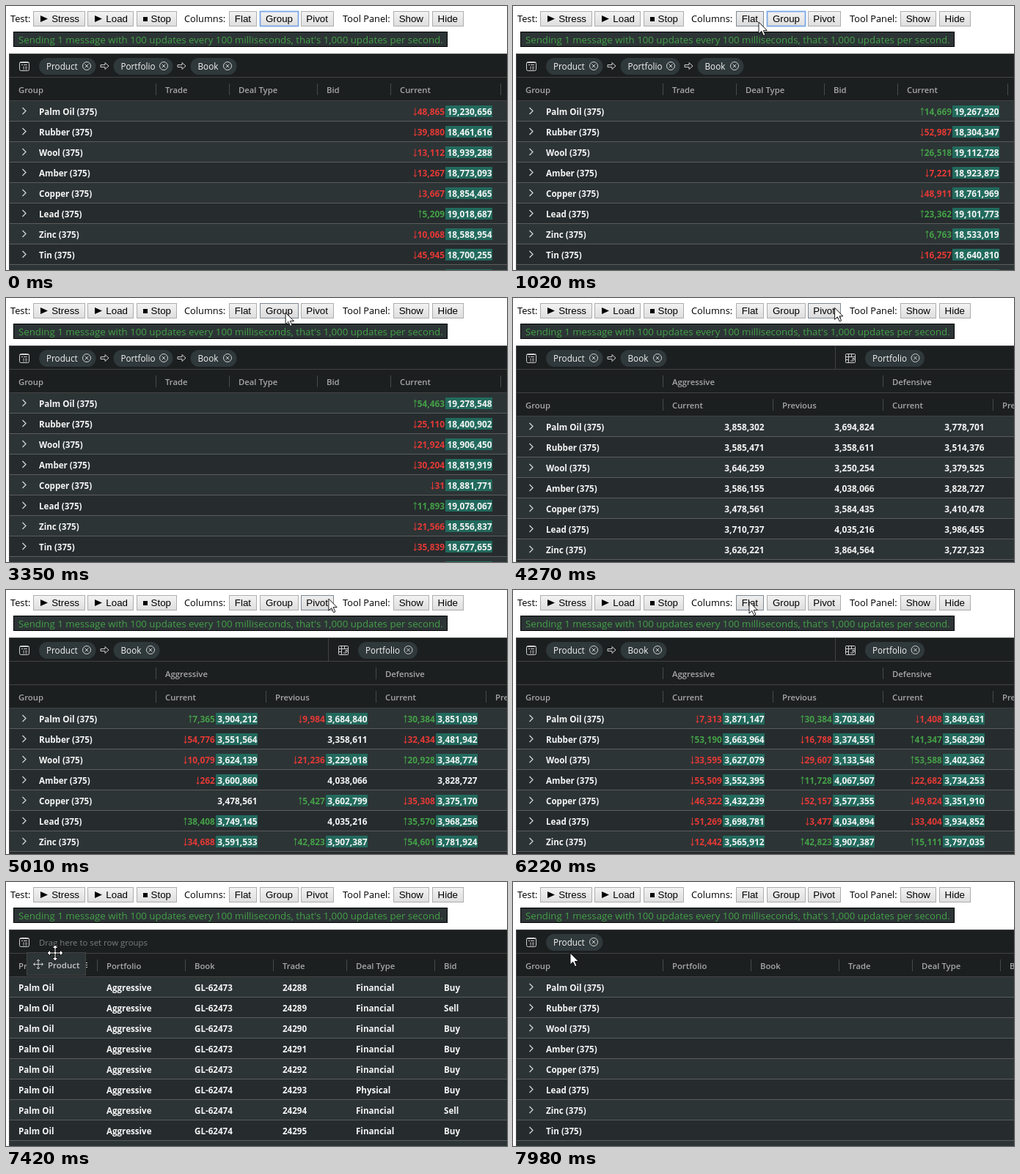
Animation of 683x361 px, one loop 8000 ms. Source, as an HTML page:

```html
<!DOCTYPE html>
<html lang="en">
<head>
<meta charset="utf-8">
<title>Live trading grid</title>
<style>
  html, body { margin: 0; width: 100%; height: 100%; overflow: hidden; background: #fff; }
  svg { display: block; font-family: "Open Sans", "Noto Sans", sans-serif; }
  text { white-space: pre; }
  .label { font-size: 12.8px; fill: #000; }
  .button { font: 13.333px "Liberation Sans", Arial, sans-serif; text-anchor: end; fill: #000; }
  .status { font-size: 13.27px; fill: #43a047; }
  .chip { font-size: 11.7px; fill: #f5f5f5; }
  .hint { font-size: 11.4px; fill: #7b7e7f; }
  .head { font-size: 11.3px; font-weight: 600; fill: #a7a8a9; }
  .ghost { font-size: 11.5px; font-weight: 600; fill: #c4c6c7; }
  .cell { font-size: 11.6px; font-weight: 700; fill: #f5f5f5; }
  .num { font-size: 11.85px; font-weight: 700; text-anchor: end; fill: #f5f5f5; }
  .up { fill: #43a047; stroke: #43a047; }
  .down { fill: #e53935; stroke: #e53935; }
  text.up, text.down { stroke: none; }
  .icon { fill: none; stroke: #d0d2d2; }
</style>
</head>
<body>
<svg id="stage" width="683" height="361" viewBox="0 0 683 361"></svg>
<script>
const LOOP = 8000, ROW = 28, TICK = 94;
const stage = document.getElementById('stage');
const products = ['Palm Oil', 'Rubber', 'Wool', 'Amber', 'Copper', 'Lead', 'Zinc', 'Tin'];

// Pointer path: time, x, y.
const pointerPath = [[80, 384, 24], [840, 335, 22], [1920, 335, 22], [2060, 384, 20], [3500, 381, 20],
  [3730, 438, 14], [5150, 440, 12], [5760, 330, 17], [6220, 322, 16], [6700, 322, 16],
  [7150, 60, 112], [7240, 60, 112], [7420, 67, 97], [7700, 78, 97]];

const random = n => { const s = Math.sin(n * 12.9898) * 43758.5453; return s - Math.floor(s); };
const text = (x, y, s, kind) => `<text x="${x}" y="${y}" class="${kind}">${s}</text>`;
const rect = (x, y, w, h, fill, more = '') =>
  `<rect x="${x}" y="${y}" width="${w}" height="${h}" fill="${fill}" ${more}/>`;
const path = (d, more = 'class="icon"') => `<path d="${d}" ${more}/>`;

function pointerAt(t) {
  let i = 0;
  while (i < pointerPath.length - 2 && pointerPath[i + 1][0] <= t) i++;
  const [t0, x0, y0] = pointerPath[i], [t1, x1, y1] = pointerPath[i + 1];
  const p = Math.min(1, Math.max(0, (t - t0) / (t1 - t0))), e = p * p * (3 - 2 * p);
  return { x: x0 + (x1 - x0) * e, y: y0 + (y1 - y0) * e };
}

// ---- toolbar ----
const buttonGroups = [
  { label: 'Test:', labelX: 6, x: 37, widths: { Stress: 70.7, Load: 63, Stop: 55 } },
  { label: 'Columns:', labelX: 243, x: 304, widths: { Flat: 38, Group: 53, Pivot: 45 } },
  { label: 'Tool Panel:', labelX: 459, x: 528, widths: { Show: 49, Hide: 43 } }];

function button(name, left, right, t, p) {
  const hover = t >= 80 && p.x >= left && p.x < right && p.y >= 7 && p.y < 28;
  const focus = name === 'Group' && t < 1400;
  const border = focus ? '#7aa7e6' : hover ? '#7d8894' : '#adadad';
  return rect(left + .5, 7.5, right - left - 1, 20, `url(#${hover ? 'hover' : 'face'})`,
    `stroke="${border}" stroke-width="${focus ? 1.8 : 1}"`) + text(right - 8, 22, name, 'button');
}

function buttonGroup({ label, labelX, x, widths }, t, p) {
  return text(labelX, 22, label, 'label') + Object.entries(widths).map(([name, w]) => {
    const out = button(name, Math.round(x), Math.round(x + w), t, p);
    x += w + 3.7;
    return out;
  }).join('');
}

const toolbar = (t, p) =>
  buttonGroups.map(g => buttonGroup(g, t, p)).join('') +
  path('M47 13l10 4.5-10 4.5zM121 13l10 4.5-10 4.5zM187 15h6v6h-6z', 'fill="#000"') +
  rect(10.5, 35.5, 591, 20, '#2d3436', 'stroke="#000"') +
  text(17, 51, "Sending 1 message with 100 updates every 100 milliseconds, that's 1,000 updates per second.", 'status');

// ---- grid parts ----
const chipWidth = { Product: 77.5, Portfolio: 81, Book: 63 };

function chips(names, x) {
  return names.map((name, i) => {
    const w = chipWidth[name], c = x + w - 12.5;
    let out = rect(x, 71, w, 23, '#2f383b', 'rx="11.5"') + text(x + 10, 87, name, 'chip') +
      `<circle cx="${c}" cy="82" r="5.5" class="icon"/>` + path(`M${c - 2.3} 79.7l4.6 4.6m0-4.6l-4.6 4.6`);
    if (i < names.length - 1) out += path(`M${x + w + 6.5} 80.5h6v-3l5 4.5-5 4.5v-3h-6z`);
    x += w + 24;
    return out;
  }).join('');
}

const frame = () =>
  rect(4, 65, 679, 296, '#424242') + rect(5, 66, 678, 31, '#1c1f20') + rect(5, 98, 678, 31, '#1c1f20') +
  rect(18.5, 76.5, 13, 12, 'none', 'rx="2" class="icon"') +
  path('M19 77.5h12M21 80.5h2m1 0h5M23 83.5h2m1 0h3M23 86h2m1 0h3');

const columnWidth = { Group: 200, Product: 120, Portfolio: 120, Book: 120, Trade: 100, 'Deal Type': 120,
  Bid: 100, Current: 150, Previous: 150, Aggressive: 300, Defensive: 300, '': 200 };

// Lays columns out from the left edge, passing each name and left edge to a painter.
function across(names, paint) {
  let x = 5;
  return names.map((name, i) => {
    const out = paint(name, x, i);
    x += columnWidth[name];
    return out;
  }).join('');
}

const headers = (names, y = 98) => across(names, (name, x) =>
  text(x + 12, y + 21, name, 'head') + rect(x + columnWidth[name] - 1, y + 8, 1, 16, '#474a4b'));

function rows(top, cells) {
  let out = '';
  for (let i = 0; i < 9; i++) {
    const y = top + i * ROW;
    out += rect(5, y, 678, 27, i % 2 ? '#262c2e' : '#2d3436') + rect(5, y + 27, 678, 1, '#5c5c5c');
    if (i < products.length) out += cells(i, y);
  }
  return out;
}

const groupCell = (i, y) =>
  path(`M22.5 ${y + 9}l4.5 4.5-4.5 4.5`, 'class="icon" stroke-width="1.3"') +
  text(45, y + 19, `${products[i]} (375)`, 'cell');

// ---- live numbers ----
// A seeded walk: at each tick the value may move; the latest move is its change.
function liveNumber(seed, { base, spread, swing, chance }, ticks) {
  let value = Math.round(base + (random(seed) - .5) * spread), change = 0;
  for (let k = 1; k <= ticks; k++) {
    if (random(seed * 57 + k) >= chance) continue;
    change = Math.round((random(seed * 91 + k * 7) - .5) * swing);
    value += change;
  }
  return { value, change };
}
const totals = { base: 18.9e6, spread: 9e5, swing: 1.1e5, chance: 1 };
const splits = { base: 3.65e6, spread: 8e5, swing: 1.2e5, chance: .18 };
const ticksSince = (start, t, most) => Math.min(most, Math.floor((t - start) / TICK));

const numberWidth = s => [...s].reduce((w, c) => w + (c === ',' ? 3.44 : 6.76), 0);

function valueCell(right, y, { value, change }) {
  const label = value.toLocaleString('en-US'), w = numberWidth(label);
  let out = '';
  if (change) {
    const size = Math.abs(change).toLocaleString('en-US'), kind = change > 0 ? 'up' : 'down';
    const end = right - w - 3.5, x = end - numberWidth(size) - 3;
    const tip = change > 0 ? `M${x - 2} ${y + 12}l2-2.5 2 2.5` : `M${x - 2} ${y + 17}l2 2.5 2-2.5`;
    out = rect(Math.round(right - w - 2.3), y + 6, Math.round(w + 3), 16, '#226a5d') +
      text(end, y + 19, size, `num ${kind}`) +
      path(`M${x} ${y + 9.5}v10${tip}`, `class="${kind}" style="fill:none"`);
  }
  return out + text(right, y + 19, label, 'num');
}

// ---- views ----
function groupView(t) {
  const ticks = t < 1400 ? ticksSince(-108, t, 14) : ticksSince(2890, t, 12);
  return frame() + chips(['Product', 'Portfolio', 'Book'], 45) +
    headers(['Group', 'Trade', 'Deal Type', 'Bid', 'Current']) +
    rows(130, (i, y) => groupCell(i, y) + valueCell(662.5, y, liveNumber(i + 1, totals, ticks))) +
    (ticks ? rect(599, 360, 64, 1, '#226a5d') : '');
}

function flatView(t) {
  const dropping = t >= 7500;
  const columns = ['Product', 'Portfolio', 'Book', 'Trade', 'Deal Type', 'Bid', 'Current'].slice(dropping ? 1 : 0);
  const trade = i => ({
    Product: products[0], Portfolio: 'Aggressive', Book: `GL-${i < 5 ? 62473 : 62474}`, Trade: 24288 + i,
    'Deal Type': i === 5 ? 'Physical' : 'Financial', Bid: i % 5 === 1 ? 'Sell' : 'Buy', Current: ''
  });
  return frame() +
    (dropping ? `<g opacity=".6">${chips(['Product'], 45)}</g>` : text(45, 87, 'Drag here to set row groups', 'hint')) +
    headers(columns) +
    rows(130, (i, y) => across(columns, (name, x) => text(x + 12, y + 19, trade(i)[name], 'cell'))) +
    (t >= 7100 && !dropping ? path('M101 110.5h10m-10 3h10m-10 3h10') : '');
}

function pivotView(t) {
  const ticks = ticksSince(4270, t, 20);
  const splitCell = (i, y, c) => valueCell(342.5 + c * 150, y, liveNumber(i * 3 + c + 20, splits, ticks));
  return frame() + chips(['Product', 'Book'], 45) + rect(439, 66, 1, 31, '#424242') +
    rect(453.5, 76.5, 13, 12, 'none', 'rx="1" class="icon"') +
    path('M453 80.5h13M457.5 76v13M461.5 76v4M453 84.5h4M460 86h4v-3m-2 1l2-2 2 2') +
    chips(['Portfolio'], 480) + rect(5, 130, 678, 31, '#1c1f20') +
    headers(['', 'Aggressive', 'Defensive']) +
    headers(['Group', 'Current', 'Previous', 'Current', 'Previous'], 130) +
    rows(162, (i, y) => groupCell(i, y) + [0, 1, 2].map(c => splitCell(i, y, c)).join(''));
}

const productView = () => frame() + chips(['Product'], 45) +
  headers(['Group', 'Portfolio', 'Book', 'Trade', 'Deal Type', 'Bid']) + rows(130, groupCell);

function view(t) {
  if (t < 1400 || (t >= 2890 && t < 4270)) return groupView(t);
  if (t < 2890) return flatView(t);
  if (t < 6400) return pivotView(t);
  return t < 7880 ? flatView(t) : productView();
}

// ---- pointer ----
const arrow = 'M0 0v16l3.8-3.6 2.8 6.2 2.4-1-2.7-6.1h5z';
const fourWay = 'M0-11l4 4.5h-3v5.5h5.5v-3l4.5 4-4.5 4v-3h-5.5v5.5h3l-4 4.5-4-4.5h3v-5.5h-5.5v3l-4.5-4 4.5-4v3h5.5v-5.5h-3z';

function pointer(t, { x, y }) {
  if (t < 80) return '';
  const dragging = t >= 7240 && t < 7880;
  const ghost = rect(-38.5, -.5, 80, 31, '#2d3436', 'stroke="#424242"') +
    path('M-23 9v13m-6.5-6.5h13M-25 11l2-2 2 2m-4 9l2 2 2-2M-27.5 13.5l-2 2 2 2m9-4l2 2-2 2') +
    text(-10, 21, 'Product', 'ghost');
  return `<g transform="translate(${x.toFixed(1)} ${y.toFixed(1)})">` + (dragging ? ghost : '') +
    path(dragging ? fourWay : arrow, 'fill="#fff" stroke="#000" stroke-width=".9"') + '</g>';
}

const gradient = (id, top, bottom) =>
  `<linearGradient id="${id}" x2="0" y2="1"><stop stop-color="${top}"/><stop offset="1" stop-color="${bottom}"/></linearGradient>`;
const defs = `<defs>${gradient('face', '#f3f3f3', '#dedede')}${gradient('hover', '#efefef', '#dadada')}</defs>`;

let shown = '';
function draw() {
  const t = performance.now() % LOOP, p = pointerAt(t);
  const markup = defs + toolbar(t, p) + view(t) + pointer(t, p);
  if (markup !== shown) stage.innerHTML = shown = markup;
  requestAnimationFrame(draw);
}
draw();
</script>
</body>
</html>
```
